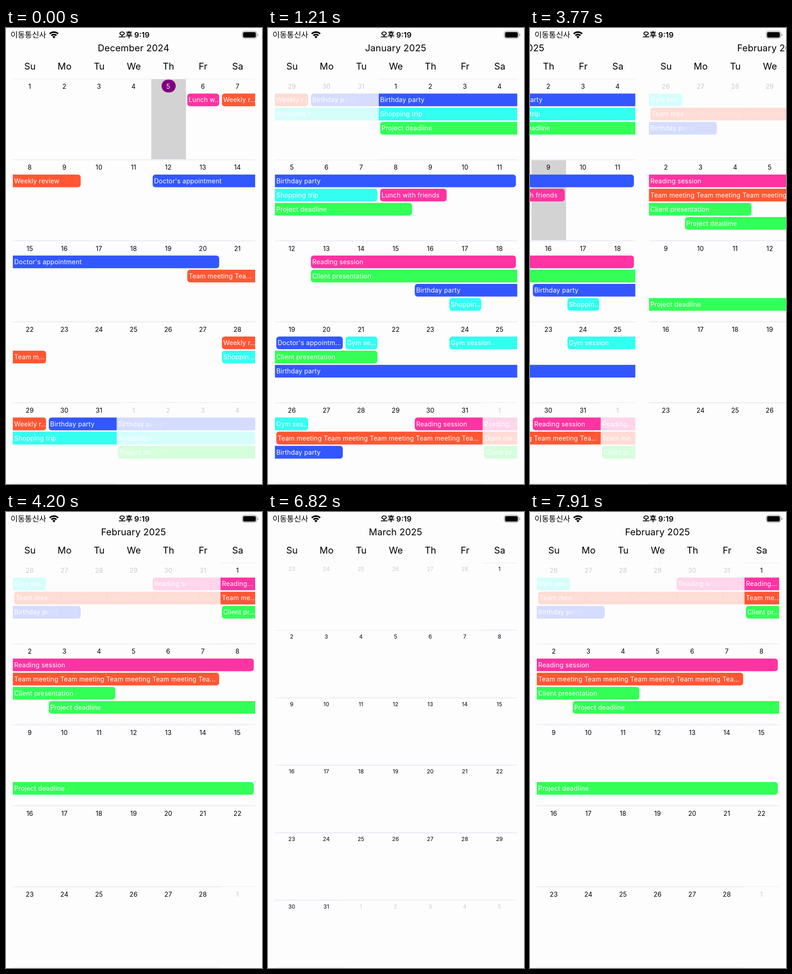
Recreate the animation shown at these times as an HTML page with a canvas. Size 561 by 998 pixels, loop 8 s.

```html
<!DOCTYPE html>
<html lang="en">
<head>
<meta charset="utf-8">
<title>Calendar</title>
<style>
  html, body { margin: 0; width: 100%; height: 100%; overflow: hidden; background: #fdfdfd; }
  canvas { display: block; }
</style>
</head>
<body>
<canvas id="stage" width="561" height="998"></canvas>
<script>
const ctx = document.getElementById('stage').getContext('2d');
const W = 561, H = 998, LOOP = 8000;
const LEFT = 15, TOP = 111, COL = 531 / 7, GRID = 886.5;
const BAR = 27.8, BAR_TOP = 32.4, PITCH = 31, INSET = 3;
const BG = '#fdfdfd', FONT = 'Inter, sans-serif';

// Days are counted from Sunday, December 1, 2024.
const dec = d => d - 1, jan = d => d + 30, feb = d => d + 61;
const months = [
  { title: 'December 2024', start: dec(1), days: 31, rows: 5 },
  { title: 'January 2025', start: jan(1), days: 31, rows: 5 },
  { title: 'February 2025', start: feb(1), days: 28, rows: 5 },
  { title: 'March 2025', start: feb(29), days: 31, rows: 6 },
];
const TODAY = dec(5), PICKED = jan(9);

const kinds = {
  lunch: ['Lunch with friends', '#ff33a1'],
  weekly: ['Weekly review', '#ff5733'],
  doctor: ["Doctor's appointment", '#3357ff'],
  team: ['Team meeting '.repeat(7).trim(), '#ff5733'],
  shopping: ['Shopping trip', '#33fff0'],
  birthday: ['Birthday party', '#3357ff'],
  project: ['Project deadline', '#33ff57'],
  reading: ['Reading session', '#ff33a1'],
  client: ['Client presentation', '#33ff57'],
  gym: ['Gym session', '#33fff0'],
};

// kind, first day, last day, slot
const events = [
  ['lunch', dec(6), dec(6), 0],
  ['weekly', dec(7), dec(9), 0],
  ['doctor', dec(12), dec(20), 0],
  ['team', dec(20), dec(22), 1],
  ['weekly', dec(28), dec(29), 0],
  ['shopping', dec(28), jan(7), 1],
  ['birthday', dec(30), jan(11), 0],
  ['project', jan(1), jan(8), 2],
  ['lunch', jan(8), jan(9), 1],
  ['reading', jan(13), jan(18), 0],
  ['client', jan(13), jan(21), 1],
  ['birthday', jan(16), jan(27), 2],
  ['shopping', jan(17), jan(17), 3],
  ['doctor', jan(19), jan(20), 0],
  ['gym', jan(21), jan(21), 0],
  ['gym', jan(24), jan(26), 0],
  ['reading', jan(30), feb(8), 0],
  ['team', jan(26), feb(7), 1],
  ['client', feb(1), feb(4), 2],
  ['project', feb(3), feb(15), 3],
];

// start, duration, direction
const swipes = [[500, 760, 1], [3604, 596, 1], [6190, 630, 1], [7200, 710, -1]];

const clamp = v => Math.max(0, Math.min(1, v));
const ease = u => 1 - (1 - u ** 1.12) ** 3;

function text(str, x, y, size, { color = '#000', align = 'center', weight = 400, spacing = 0 } = {}) {
  ctx.font = `${weight} ${size}px ${FONT}`;
  ctx.letterSpacing = spacing + 'px';
  ctx.textAlign = align;
  ctx.fillStyle = color;
  ctx.fillText(str, x, y);
}

function box(x, y, w, h, radii, color) {
  ctx.fillStyle = color;
  ctx.beginPath();
  ctx.roundRect(x, y, w, h, radii);
  ctx.fill();
}

function fit(str, width) {
  ctx.font = `400 14px ${FONT}`;
  ctx.letterSpacing = '0.25px';
  if (ctx.measureText(str).width <= width) return str;
  while (ctx.measureText(str + '...').width > width) str = str.slice(0, -1);
  return str.trim() + '...';
}

function drawBar([kind, first, last, slot], from, to, y, faded) {
  const [name, color] = kinds[kind];
  const opens = from === first, closes = to === last;
  const x = LEFT + from % 7 * COL + (opens ? INSET : 0);
  const end = LEFT + (to % 7 + 1) * COL - (closes ? INSET : 0);
  const top = y + BAR_TOP + slot * PITCH;
  const l = opens ? 6 : 0, r = closes ? 6 : 0;
  ctx.globalAlpha = faded ? 0.2 : 1;
  box(x, top, end - x, BAR, [l, r, r, l], color);

  const label = fit(name, end - x + 1.2);
  const write = (x0, x1, alpha) => {
    ctx.save();
    ctx.beginPath();
    ctx.rect(x0, top, x1 - x0, BAR);
    ctx.clip();
    ctx.globalAlpha = alpha;
    text(label, x + 3, top + 18.9, 14, { color: '#fff', align: 'left', spacing: 0.25 });
    ctx.restore();
  };
  const cellEnd = LEFT + (from % 7 + 1) * COL;
  write(x, faded ? Math.min(cellEnd, end) : end, 1);
  if (faded && cellEnd < end) write(cellEnd, end, 0.25);
  ctx.globalAlpha = 1;
}

function drawCell(day, y, h, month, picked) {
  const x = LEFT + day % 7 * COL, cx = 52 + day % 7 * COL;
  const inside = day >= month.start && day < month.start + month.days;
  const small = month.rows === 6;
  ctx.globalAlpha = inside ? 1 : 0.2;
  ctx.fillStyle = '#ececf6';
  ctx.fillRect(x, y, COL, 1.2);
  ctx.fillRect(x, y + h - 1.2, COL, 1.2);
  const shade = day === TODAY ? 1 : day === PICKED && inside ? picked : 0;
  if (shade) {
    ctx.globalAlpha = shade;
    ctx.fillStyle = '#d3d3d3';
    ctx.fillRect(x, y + 1.2, COL, h - 2.4);
    ctx.globalAlpha = 1;
  }
  if (day === TODAY) box(cx - 14.5, y + 2, 31, 28, 14, '#800080');
  const date = new Date(2024, 11, 1 + day).getDate();
  text(date, cx, y + (small ? 18.2 : 22), small ? 12 : 14, { color: day === TODAY ? '#fff' : '#000', spacing: 0.1 });
  ctx.globalAlpha = 1;
}

function drawMonth(month, picked) {
  text(month.title, 279.5, 50.5, 20.3, { spacing: 0.1 });
  ['Su', 'Mo', 'Tu', 'We', 'Th', 'Fr', 'Sa'].forEach((name, i) => text(name, 52.5 + i * COL, 91, 20.3));
  const first = month.start - month.start % 7, next = month.start + month.days;
  const h = GRID / month.rows;
  for (let row = 0; row < month.rows; row++) {
    const sunday = first + row * 7, y = TOP + row * h;
    for (let i = 0; i < 7; i++) drawCell(sunday + i, y, h, month, picked);
    // Each week is split where the month begins or ends.
    const cuts = [sunday, month.start, next, sunday + 7].filter(d => d >= sunday && d <= sunday + 7);
    for (let i = 1; i < cuts.length; i++) {
      const faded = cuts[i - 1] < month.start || cuts[i - 1] >= next;
      for (const event of events) {
        const from = Math.max(event[1], cuts[i - 1]), to = Math.min(event[2], cuts[i] - 1);
        if (from <= to) drawBar(event, from, to, y, faded);
      }
    }
  }
}

function drawStatus() {
  text('이동통신사', 10, 21, 17, { align: 'left' });
  text('오후 9:19', 280.5, 21, 16.5, { weight: 600 });
  // Wi-Fi
  ctx.strokeStyle = '#000';
  ctx.lineWidth = 3.4;
  for (const r of [13, 7.8]) {
    ctx.beginPath();
    ctx.arc(105, 22, r, -Math.PI * 0.75, -Math.PI * 0.25);
    ctx.stroke();
  }
  ctx.fillStyle = '#000';
  ctx.beginPath();
  ctx.moveTo(105, 23);
  ctx.arc(105, 22, 4.6, -Math.PI * 0.75, -Math.PI * 0.25);
  ctx.fill();
  // Battery
  ctx.strokeStyle = '#999';
  ctx.lineWidth = 1.2;
  ctx.beginPath();
  ctx.roundRect(517.6, 7.1, 31.8, 15.8, 5);
  ctx.stroke();
  box(519.5, 9, 28, 12, 3.3, '#000');
  box(550.8, 12.2, 1.8, 5.6, [0, 2, 2, 0], '#999');
}

function draw(now) {
  const t = now % LOOP;
  const page = swipes.reduce((sum, [at, span, dir]) => sum + dir * ease(clamp((t - at) / span)), 0);
  const picked = clamp((t - 3010) / 160);
  ctx.fillStyle = BG;
  ctx.fillRect(0, 0, W, H);
  months.forEach((month, i) => {
    const x = (i - page) * W;
    if (Math.abs(x) >= W) return;
    ctx.save();
    ctx.translate(x, 0);
    drawMonth(month, picked);
    ctx.restore();
  });
  drawStatus();
}

const begin = performance.now();
function tick() {
  draw(performance.now() - begin);
  requestAnimationFrame(tick);
}
tick();
</script>
</body>
</html>
```
